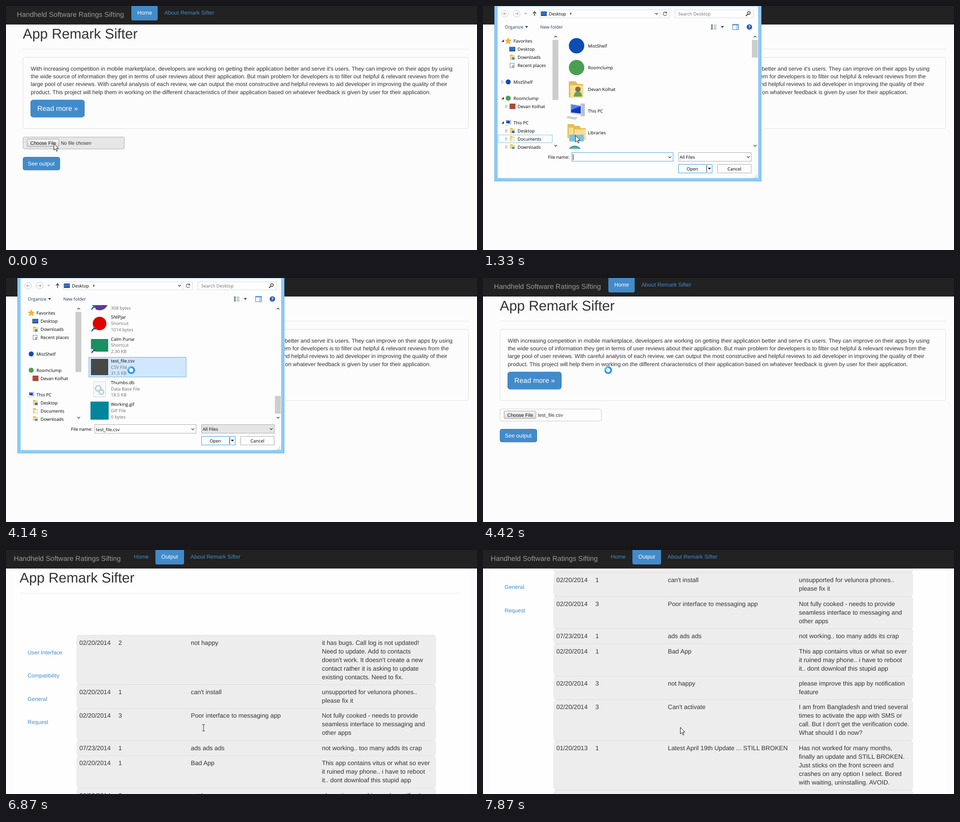
Animation, 1037 px wide and 540 px high, one loop 8000 ms. Source, as an HTML page:

```html
<!DOCTYPE html>
<html lang="en">
<head>
<meta charset="utf-8">
<title>Remark Sifter</title>
<style>
  html, body { margin: 0; width: 100%; height: 100%; overflow: hidden; background: #fcfcfc; }
  svg { display: block; width: 100%; height: 100%; text-rendering: geometricPrecision; white-space: pre; }
  .web { font-family: "Liberation Sans", Arial, sans-serif; }
  .ui { font-family: "Open Sans", "Noto Sans", sans-serif; }
</style>
</head>
<body>
<svg id="stage" viewBox="0 0 1037 540"></svg>
<script>
const BLUE = '#428bca', GRAY = '#6d6d6d', NAVY = '#1e395b';
const LOOP = 8000, PITCH = 48.2, MAX_SCROLL = 1192.3;

// Markup helpers
const rect = (x, y, w, h, fill, more = '') =>
  `<rect x="${x}" y="${y}" width="${w}" height="${h}" fill="${fill}" ${more}/>`;
const box = (x, y, w, h, fill, stroke, r = 0, more = '') =>
  rect(x, y, w, h, fill, `stroke="${stroke}" rx="${r}" ${more}`);
const circle = (x, y, r, fill, more = '') => `<circle cx="${x}" cy="${y}" r="${r}" fill="${fill}" ${more}/>`;
const path = (d, fill = 'none', stroke = 'none', more = '') =>
  `<path d="${d}" fill="${fill}" stroke="${stroke}" ${more}/>`;
const line = (d, stroke, width) => path(d, 'none', stroke, `stroke-width="${width}"`);
const text = (x, y, str, size, fill = '#333', more = '') =>
  `<text x="${x}" y="${y}" font-size="${size}" fill="${fill}" ${more}>${str}</text>`;
const group = (id, body, more = '') => `<g id="${id}" ${more}>${body}</g>`;
const label = (x, centre, str, fill = '#000', more = '') => text(x, centre + 3.5, str, 9.8, fill, more);
const centred = (x, y, str) => label(x, y, str, '#000', 'text-anchor="middle"');
const chevron = (x, y, dir = 1) => line(`M${x - 3} ${y - 1.5 * dir}l3 ${3 * dir}l3 ${-3 * dir}`, '#444', 1.4);
const drop = (x, y, fill = NAVY) => path(`M${x - 3.5} ${y - 2}h7l-3.5 4z`, fill);

// Web pages
function nav(brandX, links) {
  return rect(0, 0, 1037, 41, '#222') +
    text(brandX, 24, 'Handheld Software Ratings Sifting', 15.48, '#999') +
    links.map(([x, str, tabX, tabW]) =>
      (tabX ? rect(tabX, -5, tabW, 37, BLUE, 'rx="4"') : '') +
      text(x, 19, str, 12.2, tabX ? '#fff' : BLUE)).join('');
}

const intro = [
  "With increasing competition in mobile marketplace, developers are working on getting their application better and serve it's users. They can improve on their apps by using",
  'the wide source of information they get in terms of user reviews about their application. But main problem for developers is to filter out helpful &amp; relevant reviews from the',
  'large pool of user reviews. With careful analysis of each review, we can output the most constructive and helpful reviews to aid developer in improving the quality of their',
  'product. This project will help them in working on the different characteristics of their application based on whatever feedback is given by user for their application.'
];

const homePage =
  nav(24, [[289, 'Home', 276, 58], [348.7, 'About Remark Sifter']]) +
  text(37, 72, 'App Remark Sifter', 30.95) +
  rect(37, 95, 982, 1, '#e8e8e8') +
  box(37.5, 113.5, 981, 158, '#fcfcfc', '#e3e3e3', 4) + rect(40, 113, 976, 1, '#dadada') +
  intro.map((str, i) => text(54.5, 143 + 17.2 * i, str, 12.33)).join('') +
  box(54.5, 208, 118, 38, BLUE, '#357ebd', 5) + text(69, 232, 'Read more »', 15.48, '#fff') +
  box(37.5, 290, 223, 26.5, '#e6e6e6', '#adadad', 3, 'id="picker"') +
  box(46.5, 294.5, 70, 16.5, 'url(#bevel)', '#999', 2) +
  text(53.5, 306.7, 'Choose File', 10.6, '#111') +
  text(120.7, 306.7, 'No file chosen', 10.6, '#333', 'id="chosen"') +
  box(36.5, 333.5, 83, 30.5, 'none', '#9cc3ea', 4, 'id="focus" stroke-width="1.6"') +
  box(37.5, 334.5, 81, 28.5, BLUE, '#357ebd', 4, 'id="submit"') +
  text(48, 353, 'See output', 12.2, '#fff');

const reviews = [
  ['02/20/2014', 2, 'not happy', ['it has bugs. Call log is not updated!', 'Need to update. Add to contacts', "doesn't work. It doesn't create a new", 'contact rather it is asking to update', 'existing contacts. Need to fix.']],
  ['02/20/2014', 1, "can't install", ['unsupported for velunora phones..', 'please fix it']],
  ['02/20/2014', 3, 'Poor interface to messaging app', ['Not fully cooked - needs to provide', 'seamless interface to messaging and', 'other apps']],
  ['07/23/2014', 1, 'ads ads ads', ['not working.. too many adds its crap']],
  ['02/20/2014', 1, 'Bad App', ['This app contains vitus or what so ever', 'it ruined may phone.. i have to reboot', 'it.. dont downloaf this stupid app']],
  ['02/20/2014', 3, 'not happy', ['please improve this app by notification', 'feature']],
  ['02/20/2014', 3, "Can't activate", ['I am from Bangladesh and tried several', 'times to activate the app with SMS or', "call. But I don't get the verification code.", 'What should I do now?']],
  ['01/20/2013', 1, 'Latest April 19th Update ... STILL BROKEN', ['Has not worked for many months,', 'finally an update and STILL BROKEN.', 'Just sticks on the front screen and', 'crashes on any option I select. Bored', 'with waiting, uninstalling. AVOID.']],
  ['02/20/2014', 2, 'not happy', ['please fix it']]
];

function reviewTable() {
  let top = 23.6, out = '';
  const cell = (x, y, str) => text(x, y, str, 13.76);
  for (const [date, stars, title, lines] of reviews) {
    const height = 14.4 + 19 * lines.length, base = top + 21;
    out += rect(155, top, 792, height, '#ededed', 'rx="6"') + rect(158, top - .4, 786, 1, '#dcdcdc') +
      cell(161.5, base, date) + cell(247.5, base, stars) + cell(407, base, title) +
      lines.map((str, i) => cell(695.5, base + 19 * i, str)).join('');
    top += height;
  }
  return out;
}

const outputPage = rect(0, 0, 1037, 540, '#fcfcfc') + rect(16, 41, 1003, 499, '#fefefe') +
  group('results',
    text(30, -93, 'App Remark Sifter', 30.95) + rect(30, -70, 969, 1, '#e8e8e8') +
    reviewTable() +
    ['User Interface', 'Compatibility', 'General', 'Request']
      .map((str, i) => text(47.5, 65.5 + 51.6 * i, str, 12.2, BLUE)).join('')) +
  nav(17, [[281.5, 'Home'], [342, 'Output', 329, 63], [406.3, 'About Remark Sifter']]);

// Icons, drawn around a centre
const screen = (x, y) => rect(x - 6.5, y - 5, 13, 10, '#33475e') + rect(x - 5.5, y - 4, 11, 7, '#2f6fd0');
const computer = (x, y, s = 1) => `<g transform="translate(${x} ${y}) scale(${s})">` +
  rect(3, -6, 3.5, 10, '#b9c2c9') + path('M-5-6l9 1.5v7.500l-9-1z', '#d5dce2') +
  path('M-4.300-5.200l7.600 1.300v5.800l-7.600-.9z', '#1636c4') + path('M-4.300-5.200l7.600 1.300-7.600 3z', '#4f86ec') +
  path('M-7 4l8 1-2 1.800-7-1.300z', '#c9d0d5') + '</g>';
const folder = (x, y, s = 1) => `<g transform="translate(${x} ${y}) scale(${s})">` +
  path('M-5-6h5l1.5 2h4v10h-10.5z', '#e3bd55') + rect(-4, -3, 9.5, 9, '#f7df92') + '</g>';
const folderWith = colour => (x, y) => folder(x, y) + rect(x - 1, y, 6, 5, colour);
const dot = colour => (x, y) => circle(x, y, 5.5, colour);
const star = (x, y) =>
  path(`M${x} ${y - 7}l2 5 5 .3-4 3.500 1.500 5-4.500-3-4.500 3 1.500-5-4-3.500 5-.3z`, '#f6b638', '#d08a20', 'stroke-width=".6"');
const person = (x, y) => circle(x, y, 6, '#8a6a45') + path(`M${x - 9} ${y + 16}q0-11 9-11t9 11z`, '#62a35c');
const gear = (x, y, r) => circle(x, y, r, 'none', 'stroke="#a9c3d2" stroke-width="3" stroke-dasharray="2.4 .8"');
const page = (x, y) => box(x - 13.5, y - 16, 27, 34, '#f7f9fa', '#d0d5d8') + gear(x - 3, y - 1, 6) + gear(x + 4, y + 7, 5);

// File list: name, icon, type, size
const mark = (colour, r = 17) => y => circle(206, y, r, colour);
const tile = (colour, w = 40, h = 40) => y => rect(206 - w / 2, y - h / 2, w, h, colour, 'rx="1"');
const head = [
  ['MistShelf', mark('#0b4db3')],
  ['Roomclump', mark('#4a9f52')],
  ['Devan Kolhat', y => folder(204, y, 3) + person(209, y)],
  ['This PC', y => computer(206, y, 2.8)],
  ['Libraries', y => folder(199, y - 4, 2.6) + folder(212, y, 2.6) + rect(190, y + 4, 32, 15, '#7cc0e8', 'rx="2"')],
  ['Network', y => circle(202, y - 4, 16, '#3a9bc4') + path(`M192 ${y - 13}q10-9 18 0q-6 7-18 0z`, '#6cb84a')]
];
const filler = Array.from({ length: 18 }, (_, i) =>
  [`New folder (${i + 1})`, y => folder(205, y, 3), 'File folder']);
const tail = [
  ['Launcher', mark('#5b3a94', 19), 'Shortcut', '308 bytes'],
  ['SNIPjar', mark('#e00000', 15), 'Shortcut', '1014 bytes'],
  ['Calm Purse', tile('#1a9062', 38, 28), 'Shortcut', '2.30 KB'],
  ['test_file.csv', tile('#484848', 38, 36), 'CSV File', '31.5 KB'],
  ['Thumbs.db', y => page(206, y), 'Data Base File', '18.5 KB'],
  ['Working.gif', tile('#03859b'), 'GIF File', '0 bytes']
];
const files = [...head, ...filler, ...tail];
const rowY = k => 88 + PITCH * k;

const fileRows = files.map(([name, icon, type, size], k) => {
  const y = rowY(k);
  return icon(y) + label(231, type ? y - 13.7 : y, name) +
    (type ? label(231, y, type, GRAY) : '') + (size ? label(231, y + 13.7, size, GRAY) : '');
}).join('');
const shortcutArrows = [24, 25, 26].map(k => {
  const y = rowY(k) + 13.7;
  return rect(187, y - 5, 10, 10, '#fff') +
    path(`M188 ${y + 4}q0-6 4-6v-3h5v5l-2-1q-4 1-5 5z`, '#1c4fa8');
}).join('');

// Side tree: text x, centre y, caption, icon
const tree = [
  [67, 77, 'Favorites', star],
  [76, 95.5, 'Desktop', screen],
  [76, 113.5, 'Downloads', folderWith('#3b8bd0')],
  [76, 131.5, 'Recent places', (x, y) => box(x - 5, y - 5, 9, 10, '#f4f4f4', '#888') + circle(x + 2, y + 2, 3, '#8fb6d6')],
  [67, 168, 'MistShelf', dot('#0b4db3')],
  [67, 204, 'Roomclump', dot('#4a9f52')],
  [76, 222, 'Devan Kolhat', (x, y) => rect(x - 6, y - 6, 13, 12, '#a8493c')],
  [67, 258, 'This PC', computer],
  [76, 276, 'Desktop', folderWith('#2f6fd0')],
  [76, 294, 'Documents', (x, y) => folder(x, y) + rect(x - 1, y - 3, 5, 8, '#e9f2f8')],
  [76, 312, 'Downloads', folderWith('#3b8bd0')]
];
const treeItems = tree.map(([x, y, str, icon]) => icon(x - 11.5, y) + label(x, y, str)).join('');
const carets = tree.filter(([x, y]) => x === 67 || y > 200).map(([x, y, str]) =>
  x === 67 && str !== 'MistShelf'
    ? path(`M46 ${y - 3}v5.5h-5.5z`, '#333')
    : path(`M${x - 26} ${y - 3.5}v7l4-3.5z`, '#fff', '#999')).join('');

const field = (x, w) => box(x, 8.5, w, 17.5, '#fff', '#d9d9d9');
const arrowButton = (x, turn) => `<g transform="translate(${x} 17) rotate(${turn})">` +
  circle(0, 0, 7.5, '#fff', 'stroke="#c4c4c4"') + line('M3.5 0h-7m3-3l-3 3 3 3', '#b4b4b4', 1.4) + '</g>';
const toolbar =
  arrowButton(48.5, 0) + arrowButton(74, 180) + drop(94, 17, '#bbb') +
  line('M113.5 22v-9m-3.5 3.5l3.5-4 3.5 4', '#444', 1.6) +
  field(125.5, 264) + screen(134, 17) + label(145, 17, 'Desktop') + path('M192 14v6l3.5-3z', '#555') + chevron(382, 17) +
  field(389.5, 21) + line('M404 15a4 4 0 1 0 .5 3.5M404.5 12v3.5h-3.5', '#666', 1.3) +
  field(422.5, 173) + label(430, 17, 'Search Desktop', GRAY) +
  circle(585.5, 15.5, 3, 'none', 'stroke="#333" stroke-width="1.3"') + line('M583 18l-4 4', '#333', 1.8) +
  label(48, 46.5, 'Organize', NAVY) + drop(96, 46.5) + label(126, 46.5, 'New folder', NAVY) +
  [41, 45, 49].map(y => rect(502, y, 4, 3, '#4a8a70') + rect(508, y + 1, 6, 1, '#555')).join('') + drop(527, 46.5) +
  box(549.5, 40.5, 13, 12, '#fff', '#4b83b5') + rect(550, 41, 12, 2, '#76a9d6') + rect(557, 43, 5, 9, '#b5d6f2') +
  circle(586.5, 46.5, 6, '#2c58b8') + label(586.5, 46.3, '?', '#fff', 'font-weight="700" text-anchor="middle"');

const grip = [0, 1, 2].map(row => [...Array(row + 1).keys()]
  .map(i => rect(602 - 3 * i, 373 + 3 * row, 1.5, 1.5, '#aaa')).join('')).join('');
const footer =
  label(190, 334, 'File name:', '#000', 'text-anchor="end"') +
  box(195.5, 324.5, 223, 19, '#fff', '#569de5', 0, 'id="nameBox"') + chevron(411.5, 334.5) +
  label(198, 335, 'test_file.csv', '#000', 'id="fileName"') + rect(198, 328, 1, 13, '#000', 'id="caret"') +
  box(430.5, 324.5, 160, 19, '#fff', '#ababab', 0, 'id="filter"') + label(433, 334, 'All Files') + chevron(584, 334) +
  box(430.5, 350.5, 74, 19, '#fdfdfd', '#3c99ee') + rect(492, 352, 1, 16, '#222') + drop(498.5, 360, '#111') +
  centred(461, 360, 'Open') + box(516.5, 350.5, 74, 19, '#fdfdfd', '#adadad') + centred(553.5, 360, 'Cancel') + grip;

const dialog =
  box(25.5, -2, 587, 389.5, '#8ccafa', '#74b3e2') + box(31.5, .5, 575, 381, '#fdfdfd', '#7dbdec') + toolbar +
  `<g clip-path="url(#treeClip)">${box(33.5, 285.5, 119, 17, '#fff', '#7cc4ea', 0, 'id="outline"')}${treeItems}${group('carets', carets)}</g>` +
  chevron(160, 68, -1) + rect(153, 75, 13, 133, '#cdcdcd') + chevron(160, 309) +
  `<g clip-path="url(#listClip)">${group('list',
    box(182.5, rowY(27) - 21.6, 214, 43.5, '#d0e7fd', '#66aede', 0, 'id="selected"') +
    box(182.5, 0, 214, 43.5, '#e5f3fa', '#7cc4e8', 0, 'id="hover"') +
    fileRows + group('arrows', shortcutArrows))}</g>` +
  chevron(599, 68, -1) + rect(592, 75, 13, 39, '#cdcdcd', 'id="thumb"') + chevron(599, 309) + footer;

const outlined = 'stroke-width="1" stroke-linejoin="round"';
const cursors = {
  arrow: path('M.5.5v14.5l3.3-3.1 2.5 5.6 2.2-1-2.5-5.4h4.6z', '#fff', '#111', outlined),
  hand: path('M-1.5 1q1.5-2 3 0v6q5-1 6.5 2v5l-2 6h-7l-5-7q-1-3 2-2l2.5 2z', '#fff', '#111', outlined),
  beam: path('M-3-6.5h2.5l.5.5.5-.5h2.5M0-6v13M-3 7.5h2.5l.5-.5.5.5h2.5', 'none', '#222'),
  busy: circle(0, 0, 6.5, '#fff', 'stroke="#2f95f5" stroke-width="4"') + line('M-6.5 0a6.5 6.5 0 0 1 6.5-6.5', '#55c6fa', 4)
};

const clip = (id, x, w) => `<clipPath id="${id}">${rect(x, 60, w, 256, '#000')}</clipPath>`;
const $ = id => document.getElementById(id);
$('stage').innerHTML =
  `<defs>${clip('treeClip', 32, 121)}${clip('listClip', 180, 412)}<linearGradient id="bevel" x2="0" y2="1"><stop stop-color="#f8f8f8"/><stop offset="1" stop-color="#d9d9d9"/></linearGradient></defs>` +
  rect(0, 0, 1037, 540, '#fcfcfc') +
  group('home', homePage, 'class="web"') + group('output', outputPage, 'class="web"') +
  group('dialog', dialog, 'class="ui"') +
  group('pointer', Object.entries(cursors).map(([name, body]) => group(name, body)).join(''));

// Stepped tracks: [time, ...values]
const track = {
  pointer: [[0, 'arrow', 105, 304], [1200, 'arrow', 150, 296], [1330, 'arrow', 203, 286], [1450, 'arrow', 315, 290],
    [1600, 'arrow', 282, 282], [1750, 'arrow', 278, 268], [1900, 'arrow', 274, 240], [2050, 'arrow', 272, 215],
    [2540, 'arrow', 272, 246], [3470, 'arrow', 272, 229], [3620, 'arrow', 272, 214], [3740, 'arrow', 272, 205],
    [4140, 'busy', 275.7, 204], [4790, 'arrow', 245, 250], [4910, 'arrow', 206, 315], [5050, 'arrow', 170, 380],
    [5170, 'arrow', 130, 420], [5290, 'arrow', 105, 400], [5410, 'arrow', 94, 369], [5550, 'hand', 93, 360],
    [5670, 'hand', 93, 354], [6590, 'arrow', 182, 346], [6740, 'arrow', 300, 372], [6870, 'beam', 435, 393], [7870, 'arrow', 434, 392]],
  dialog: [[0, 0], [1080, .3], [1200, .8], [1330, 1], [4280, .4], [4420, 0]],
  carets: [[0, 1], [1600, .75], [1750, .5], [1900, .25], [2050, 0]],
  scroll: [[0, 0], [2050, .25], [2170, .6], [2300, 1]],
  hover: [[0, -1], [1750, 4], [2050, -1], [2540, 28], [3620, -1]],
  picker: [[0, '#e6e6e6', '#adadad'], [810, '#d6d6d6', '#adadad'], [930, '#e6e6e6', '#adadad'], [4140, '#fdfdfd', '#ccc']],
  submit: [[0, BLUE, '#357ebd'], [5550, '#3071a9', '#285e8e'], [6050, '#2a6496', '#285e8e'], [6320, '#3071a9', '#285e8e']],
  results: [[0, 165], [7450, 0], [7590, -41.3], [7870, -82.6]]
};
const at = (name, t) => track[name].findLast(key => key[0] <= t).slice(1);
const set = (id, attrs) => { for (const name in attrs) $(id).setAttribute(name, attrs[name]); };
const show = (id, visible) => set(id, { display: visible ? 'inline' : 'none' });
const move = (id, x, y) => set(id, { transform: `translate(${x} ${y})` });

function draw(now) {
  const t = now % LOOP;
  const [shape, x, y] = at('pointer', t);
  move('pointer', x, y);
  for (const name in cursors) show(name, name === shape);

  for (const id of ['picker', 'submit']) {
    const [fill, stroke] = at(id, t);
    set(id, { fill, stroke });
  }
  $('chosen').textContent = t < 4140 ? 'No file chosen' : 'test_file.csv';
  show('focus', t >= 6050);

  const [opacity] = at('dialog', t);
  show('dialog', opacity > 0);
  set('dialog', { opacity });
  set('carets', { opacity: at('carets', t)[0] });
  show('outline', t < 1450);
  const [scroll] = at('scroll', t);
  move('list', 0, -MAX_SCROLL * scroll);
  set('thumb', { y: 75 + 186 * scroll });
  const [hovered] = at('hover', t);
  show('hover', hovered >= 0);
  set('hover', { y: rowY(hovered) - 21.6 });
  const picked = t >= 2420;
  show('selected', picked);
  show('fileName', picked);
  show('caret', t < 1750);
  show('arrows', t >= 2690);
  set('nameBox', { stroke: picked ? '#ababab' : '#569de5' });
  set('filter', { fill: picked ? '#e5e5e5' : '#fff' });

  show('home', t < 6590);
  show('output', t >= 6590);
  move('results', 0, at('results', t)[0]);
  requestAnimationFrame(draw);
}
requestAnimationFrame(draw);
</script>
</body>
</html>
```
